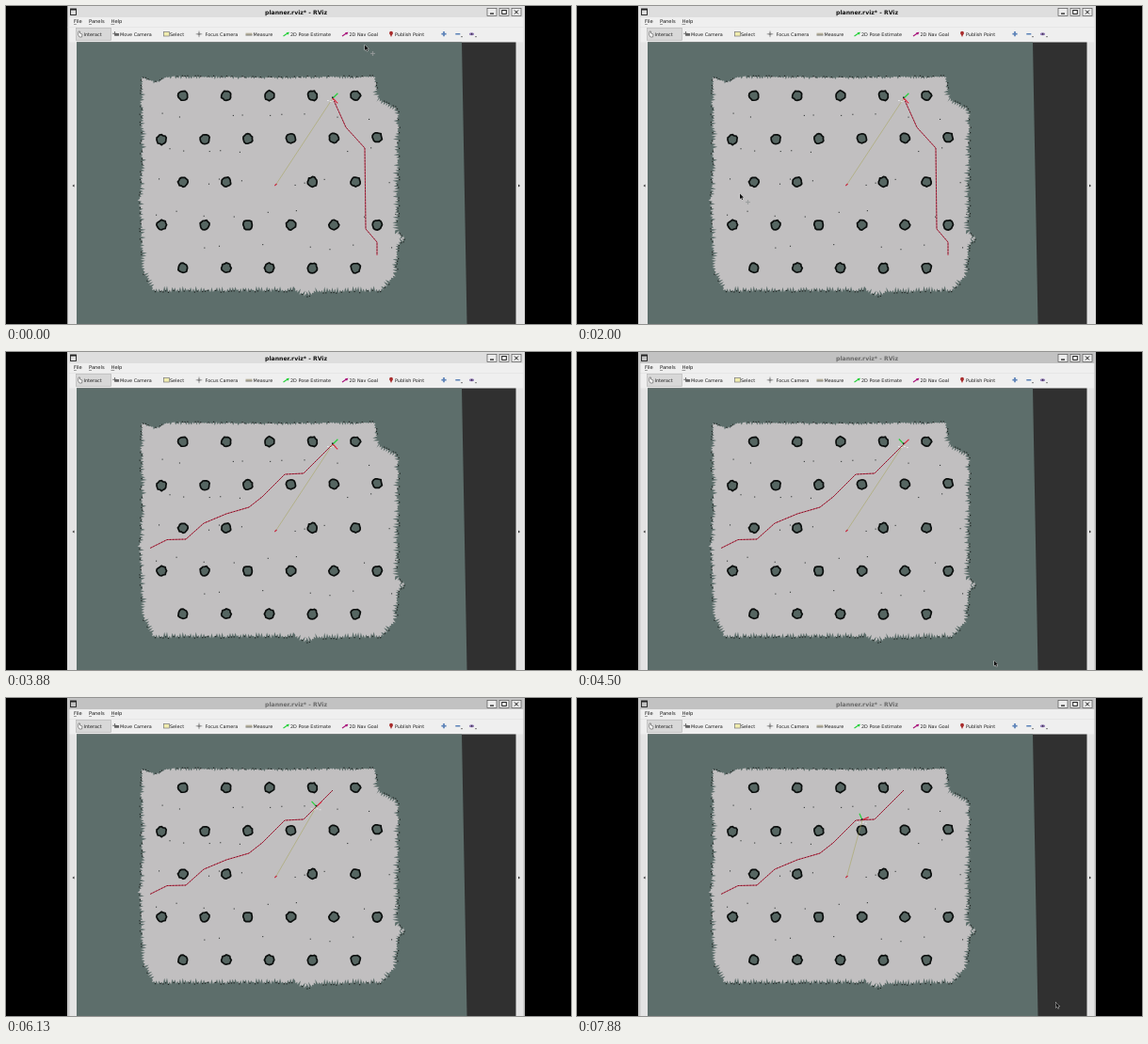
An HTML page with a canvas that plays this animation: 600 px wide and 338 px high, repeating every 8000 ms.

```html
<!DOCTYPE html>
<html>
<head>
<meta charset="utf-8">
<style>
html, body { margin: 0; width: 100%; height: 100%; overflow: hidden; background: #000; }
canvas { display: block; }
</style>
</head>
<body>
<canvas id="stage" width="600" height="338"></canvas>
<script>
const LOOP = 8000, STEP = 125;
const FONT = '"DejaVu Sans", sans-serif';
const UNKNOWN = '#5d6e6b', FREE = '#c1bfc0', DARK = '#303030';
const RED = '#d8263c', GREEN = '#25d03a', MAGENTA = '#a8127a';
const stage = document.getElementById('stage').getContext('2d');
const backdrop = document.createElement('canvas');
backdrop.width = 600;
backdrop.height = 338;

let seed = 11;
const rnd = () => (seed = (seed * 16807) % 2147483647) / 2147483647;

// Drawing helpers
const rect = (c, x, y, w, h, color) => { c.fillStyle = color; c.fillRect(x, y, w, h); };

function trace(c, points, closed) {
  c.beginPath();
  points.forEach(([x, y]) => c.lineTo(x, y));
  if (closed) c.closePath();
}

function line(c, points, color, width = 1, dash = []) {
  trace(c, points);
  c.setLineDash(dash);
  c.strokeStyle = color;
  c.lineWidth = width;
  c.stroke();
  c.setLineDash([]);
}

function frame(c, x, y, w, h, color, width = .7) {
  c.strokeStyle = color;
  c.lineWidth = width;
  c.strokeRect(x, y, w, h);
}

function shape(c, points, color) {
  trace(c, points, true);
  c.fillStyle = color;
  c.fill();
}

function disc(c, x, y, rx, ry, color) {
  c.beginPath();
  c.ellipse(x, y, rx, ry, 0, 0, 7);
  c.fillStyle = color;
  c.fill();
}

function text(c, str, x, y, size = 4.9, color = '#1c1c1c', weight = '') {
  c.font = `${weight} ${size}px ${FONT}`;
  c.fillStyle = color;
  c.fillText(str, x, y);
}

function cross(c, x, y, r, color, width = .8) {
  line(c, [[x - r, y], [x + r, y]], color, width);
  line(c, [[x, y - r], [x, y + r]], color, width);
}

function arrow(c, x, y, color) {
  line(c, [[x, y + 4], [x + 4.5, y + 1]], color, 1.2);
  shape(c, [[x + 6.5, y - .3], [x + 5, y + 2.8], [x + 3, y + .2]], color);
}

// Map
const outline = [[144, 76], [160, 81], [172, 75], [280, 76], [392, 75], [395, 99], [416, 111],
  [415, 240], [424, 247], [416, 253], [413, 285], [399, 302], [330, 303], [318, 308],
  [305, 302], [157, 302], [146, 282], [142, 205], [145, 175]];

function drawFreeSpace(c) {
  const edge = [], specks = [];
  outline.forEach(([x0, y0], i) => {
    const [x1, y1] = outline[(i + 1) % outline.length];
    const dx = x1 - x0, dy = y1 - y0, len = Math.hypot(dx, dy), n = Math.ceil(len / 1.4);
    for (let k = 0; k < n; k++) {
      const x = x0 + dx * k / n, y = y0 + dy * k / n;
      const depth = y < 90 ? 2.5 : 5;
      const out = k % 2 ? rnd() * depth * .5 : -rnd() * depth;
      const p = [x + dy / len * out, y - dx / len * out];
      edge.push(p);
      if (out > 0 && rnd() < .5) specks.push(p);
    }
  });
  shape(c, edge, FREE);
  specks.forEach(([x, y]) => rect(c, x - .5, y - .5, 1.2, 1.2, '#1c211f'));

  // Stray readings between the rows of pillars
  for (let row = 0; row < 5; row++)
    for (let x = 158; x < 410; x += 22)
      if (rnd() < .7) rect(c, x + rnd() * 18, 117 + row * 34.5 + (rnd() - .5) * 8, 1.1, 1.1, '#333736');
}

function drawPillar(c, x, y) {
  const ring = [];
  for (let a = 0; a < 16; a++) {
    const r = 4.5 + rnd() * 1.1, angle = a * Math.PI / 8;
    ring.push([x + r * Math.cos(angle), y + r * Math.sin(angle)]);
  }
  shape(c, ring, '#566662');
  c.strokeStyle = '#0b0e0d';
  c.lineWidth = 1.7;
  c.stroke();
}

function drawMap(c) {
  rect(c, 75, 38.5, 466.5, 300, DARK);
  shape(c, [[75, 38.5], [484, 38.5], [489.5, 338], [75, 338]], UNKNOWN);
  drawFreeSpace(c);
  for (let row = 0; row < 5; row++) {
    const odd = row % 2;
    for (let i = 0; i < 5 + odd; i++)
      if (row !== 2 || i !== 2)
        drawPillar(c, (odd ? 165.2 : 188) + i * 45.8, 95.3 + row * 45.8 + (row === 1 ? 1 - i * .5 : 0));
  }
}

// Window
function drawWindow(c) {
  rect(c, 65.5, 0, 485.5, 338, '#efefef');
  rect(c, 67, 38.5, 482, 300, '#e4e4e4');
  rect(c, 65.5, 22, 485.5, .5, '#dcdcdc');
  [['File', 72, 2.8], ['Panels', 88, 3], ['Help', 111.5, 3.7]].forEach(([s, x, w]) => {
    text(c, s, x, 18.3, 5.2);
    rect(c, x, 19.1, w, .5, '#444');
  });
  shape(c, [[72.5, 189.5], [72.5, 192.5], [70.5, 191]], '#333');
  shape(c, [[544, 189.5], [544, 192.5], [546, 191]], '#333');
  drawMap(c);
}

function drawTitle(c, focused) {
  const border = focused ? '#dedede' : '#c2c2c2';
  rect(c, 65.5, 0, 485.5, 12, border);
  rect(c, 65.5, 12, 1.8, 326, border);
  rect(c, 549.2, 12, 1.8, 326, border);
  text(c, 'planner.rviz* - RViz', 275, 8.8, 6.16, focused ? '#111' : '#6a6a6a', 'bold');
  frame(c, 68.5, 3, 6, 6.5, '#222', .9);
  rect(c, 68.5, 3, 6, 1.5, '#222');
  for (let i = 0; i < 3; i++) {
    const x = 511 + i * 13;
    rect(c, x, 2.5, 10, 8, '#ececec');
    frame(c, x, 2.5, 10, 8, '#555');
    if (i === 0) rect(c, x + 3, 7.5, 4, 1.2, '#111');
    if (i === 1) frame(c, x + 2.7, 4.5, 4.6, 4, '#111', .9);
    if (i === 2) {
      line(c, [[x + 3, 4.5], [x + 7, 8.5]], '#111');
      line(c, [[x + 7, 4.5], [x + 3, 8.5]], '#111');
    }
  }
}

function drawToolbar(c, navTool) {
  const [x, w] = navTool ? [355.5, 40.5] : [74.5, 37];
  rect(c, x, 23.5, w, 13, '#d8d8d8');
  frame(c, x, 23.5, w, 13, '#b8b8b8');

  [['Interact', 82.5], ['Move Camera', 121], ['Select', 174], ['Focus Camera', 211.5],
    ['Measure', 262.5], ['2D Pose Estimate', 302], ['2D Nav Goal', 364.5], ['Publish Point', 413]]
    .forEach(([s, tx]) => text(c, s, tx, 31.6));

  shape(c, [[77, 27], [78.5, 27], [78.5, 29], [81, 30], [80.5, 33], [78, 33], [76.5, 30.5]], '#fafafa');
  c.strokeStyle = '#555';
  c.lineWidth = .6;
  c.stroke();
  cross(c, 115.5, 29.3, 2.3, '#555');
  rect(c, 115.5, 29, 4.5, 2.8, '#666');
  rect(c, 167.5, 27.5, 6, 4.5, '#f0ecae');
  frame(c, 167.5, 27.5, 6, 4.5, '#777');
  cross(c, 205, 29.8, 3.3, '#888');
  disc(c, 205, 29.8, 1.5, 1.5, '#888');
  rect(c, 254.5, 28.7, 7, 2.4, '#b5b09c');
  line(c, [[254.5, 31.1], [261.5, 31.1]], '#666', .7);
  arrow(c, 294.5, 28, GREEN);
  arrow(c, 357, 28, MAGENTA);
  disc(c, 409, 28.6, 1.9, 1.9, '#a82c2c');
  shape(c, [[407.3, 29.3], [410.7, 29.3], [409, 33]], '#a82c2c');
  cross(c, 465, 29.7, 2.6, '#5b82b8', 1.7);
  rect(c, 477.3, 29, 5, 1.5, '#5b82b8');
  disc(c, 494.5, 29.8, 2.6, 1.5, '#8a70b0');
  rect(c, 494, 29.2, 1.2, 1.2, '#222');
  [484, 499].forEach(tx => shape(c, [[tx - 1, 32.3], [tx + 1, 32.3], [tx, 33.5]], '#333'));
}

// Motion
const ease = (t, from, to) => {
  const f = Math.min(1, Math.max(0, (t - from) / (to - from)));
  return f * f * (3 - 2 * f);
};

function along(path, dist) {
  for (let i = 1; i < path.length; i++) {
    const [x, y] = path[i - 1], dx = path[i][0] - x, dy = path[i][1] - y;
    const len = Math.hypot(dx, dy);
    if (dist <= len) return [x + dx * dist / len, y + dy * dist / len];
    dist -= len;
  }
}

const oldPath = [[347, 98], [361, 129], [381, 151], [382, 237], [394, 251], [394, 265]];
const newPath = [[347, 98], [316, 129], [296, 130], [272, 154], [258, 165], [234, 172],
  [210, 182], [191, 199], [171, 199.5], [153, 208.5]];
const goal = newPath[newPath.length - 1];

// Stretches in which the pointer is visible: [time, x, y]
const pointerRuns = [
  [[0, 381, 41.5], [375, 376, 29], [500, 376, 29], [875, 222.5, 303.5], [1375, ...goal],
    [1500, ...goal], [1875, 173, 199.5], [2000, 173, 199.5], [2375, 168, 230]],
  [[4250, 445, 325], [4750, 441, 331]],
  [[6750, 492, 338], [7375, 517, 327], [7875, 508.5, 323.5]]];

function pointerAt(t) {
  const run = pointerRuns.find(r => t >= r[0][0] && t <= r[r.length - 1][0]);
  if (!run) return null;
  const i = Math.max(1, run.findIndex(k => k[0] >= t));
  const [t0, x0, y0] = run[i - 1], [t1, x1, y1] = run[i], f = ease(t, t0, t1);
  return [x0 + (x1 - x0) * f, y0 + (y1 - y0) * f];
}

function drawPath(c, path) {
  line(c, path, '#bf3049', 1);
  line(c, path, 'rgba(60,16,26,.75)', .9, [1.2, 2]);
}

function drawRobot(c, t) {
  const [x, y] = along(newPath, Math.max(0, t - 4800) * .0185);
  const heading = .8 - 1.55 * ease(t, 3900, 4500) + .33 * ease(t, 6900, 7900);
  line(c, [[286.5, 190], [x, y]], 'rgba(165,162,85,.65)', .8);
  line(c, [[285.3, 191], [287.5, 189]], '#c82840', 1.1);
  for (let i = 0; i < 4; i++)
    rect(c, x - 6 + i * 3, y + 2 + i % 2, 1.8, .9, 'rgba(250,250,250,.75)');
  const axis = (angle, color) =>
    line(c, [[x, y], [x + 7.5 * Math.cos(angle), y + 7.5 * Math.sin(angle)]], color, 1.2);
  axis(heading - Math.PI / 2, GREEN);
  axis(heading, RED);
  rect(c, x - 1, y - 1.5, 1.5, 1.5, '#182028');
}

function drawGoal(c, [x, y]) {
  c.save();
  c.translate(...goal);
  c.rotate(Math.atan2(y - goal[1], x - goal[0]));
  line(c, [[0, 0], [17, 0]], GREEN, 2);
  shape(c, [[16, -3.5], [25, 0], [16, 3.5]], GREEN);
  c.restore();
}

function drawPointer(c, t, navTool) {
  const tip = pointerAt(t);
  if (!tip) return;
  const [x, y] = tip;
  if (t > 1500 && t < 1900) drawGoal(c, tip);
  if (navTool) arrow(c, x + 5, y + 8.5, MAGENTA);
  else if (t < 2500) cross(c, x + 8.5, y + 9, 2.5, 'rgba(150,155,155,.8)', 1.2);
  trace(c, [[0, 0], [0, 5.6], [1.3, 4.5], [2.4, 6.6], [3.2, 6.2], [2.2, 4.2], [4, 4]]
    .map(([px, py]) => [x + px, y + py]), true);
  c.strokeStyle = '#ddd';
  c.lineWidth = .9;
  c.stroke();
  c.fillStyle = '#111';
  c.fill();
}

function draw(now) {
  const t = Math.floor(now % LOOP / STEP) * STEP;
  const navTool = t >= 375 && t < 1900;
  stage.drawImage(backdrop, 0, 0);
  drawTitle(stage, t < 4125);
  drawToolbar(stage, navTool);
  drawPath(stage, t < 3750 ? oldPath : newPath);
  drawRobot(stage, t);
  drawPointer(stage, t, navTool);
}

rect(stage, 0, 0, 600, 338, '#000');
drawWindow(backdrop.getContext('2d'));
let start;
function tick(now) {
  start ??= now;
  draw(now - start);
  requestAnimationFrame(tick);
}
requestAnimationFrame(tick);
</script>
</body>
</html>
```
